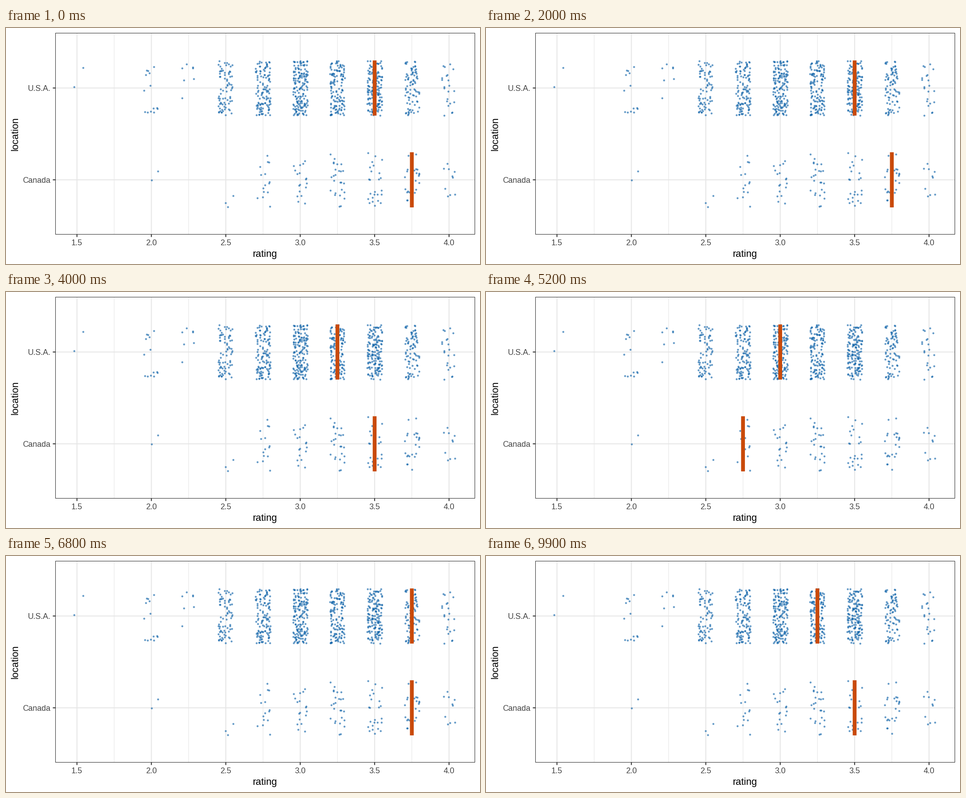
Animation of 1058x529 px, one loop 10000 ms. Source, as a matplotlib script:

```python
import numpy as np
import matplotlib.pyplot as plt
from matplotlib.animation import FuncAnimation
from matplotlib.patches import Rectangle

W, H, DPI = 1058, 529, 100
PX = 72 / DPI                      # points per pixel
LEFT, TOP, RIGHT, BOTTOM = 110.5, 11.5, 1046.5, 462.5
ROW = {"U.S.A.": 134.5, "Canada": 340.3}
BAR_W, BAR_H = 8.5, 123.6
JITTER = np.array([16.4, 61.5])
BLUE, ORANGE = "#0f63a9", "#c94a0a"
GRID, DARK, GREY = "#e6e6e6", "#333333", "#444444"

# rating drawn for each location, one per state
STEP = 4                           # three frames of rest, one in between
DRAWS = {
    "U.S.A.": [3.5, 3.0, 3.25, 3.75, 3.0, 3.5, 2.75, 3.25, 3.25, 3.5, 3.25, 3.0,
               3.5, 3.0, 2.5, 3.0, 3.25, 3.75] + [3.0] * 7,
    "Canada": [3.75, 3.5, 3.25, 3.5, 4.0, 3.75, 3.0, 3.0, 3.75, 3.5, 3.5, 3.75,
               3.25, 2.75, 3.25, 3.0, 3.5, 3.75, 2.75, 3.0, 2.0, 3.5, 4.0, 3.0, 3.25],
}

# points per rating column
COUNTS = {
    "U.S.A.": {2.0: 14, 2.5: 75, 2.75: 117, 3.0: 160, 3.25: 131, 3.5: 155,
               3.75: 82, 4.0: 22},
    "Canada": {2.75: 15, 3.0: 18, 3.25: 26, 3.5: 25, 3.75: 24, 4.0: 10},
}
LONE = [(172, 89), (152, 132), (403, 81), (393, 90), (417, 88), (417, 90), (397, 117),
        (419, 114), (393, 157), (339, 321), (325, 341), (507, 376), (490, 392), (495, 401)]


def x_of(rating):
    return 656.7 + 332.2 * (rating - 3)


def column(rng, rating, y, n):
    return [x_of(rating), y] + JITTER * rng.uniform(-1, 1, (n, 2))


plt.rcParams["font.family"] = "Liberation Sans"
fig = plt.figure(figsize=(W / DPI, H / DPI), dpi=DPI, facecolor="white")
ax = fig.add_axes([0, 0, 1, 1])
ax.set(xlim=(0, W), ylim=(H, 0))
ax.axis("off")


def line(xs, ys, color, width, z):
    ax.plot(xs, ys, color=color, lw=width * PX, zorder=z,
            solid_capstyle="butt", snap=False)


def label(x, y, text, size, color, ha="center", **kw):
    ax.text(x, y, text, fontsize=size * PX, color=color, ha=ha, va="baseline", **kw)


# grid, ticks and labels
for rating in np.arange(1.75, 4, 0.5):
    line([x_of(rating)] * 2, [TOP, BOTTOM], GRID, 1.1, 1)
for rating in np.arange(1.5, 4.1, 0.5):
    x = x_of(rating)
    line([x, x], [TOP, BOTTOM], GRID, 2.1, 1)
    line([x, x], [BOTTOM, BOTTOM + 6], DARK, 2.1, 5)
    label(x, 487, f"{rating:.1f}", 17.6, GREY)
for name, y in ROW.items():
    line([LEFT, RIGHT], [y, y], GRID, 2.1, 1)
    line([LEFT - 6, LEFT], [y, y], DARK, 2.1, 5)
    label(99.5, y + 6.5, name, 17.6, GREY, ha="right")
label(578.2, 513.5, "rating", 22, "black")
label(27, 237, "location", 22, "black", rotation=90, rotation_mode="anchor")
ax.add_patch(Rectangle((LEFT, TOP), RIGHT - LEFT, BOTTOM - TOP, fill=False,
                       ec=DARK, lw=1.1 * PX, zorder=6, snap=False))

# ratings
rng = np.random.default_rng(12)
points = np.vstack([np.array(LONE) + 0.4] + [
    column(rng, rating, ROW[name], n)
    for name, counts in COUNTS.items() for rating, n in counts.items()])
ax.scatter(*points.T, s=(4.3 * PX) ** 2, color=BLUE, alpha=0.66, lw=0, zorder=3)

# sampled outcomes
bars = {name: ax.add_patch(Rectangle((0, y - BAR_H / 2), BAR_W, BAR_H, color=ORANGE,
                                     lw=0, zorder=4, snap=False))
        for name, y in ROW.items()}


def update(frame):
    state, phase = divmod(frame, STEP)
    mix = 0.5 if phase == STEP - 1 else 0
    for name, bar in bars.items():
        path = DRAWS[name]
        start, end = path[state], path[(state + 1) % len(path)]
        bar.set_x(x_of(start + mix * (end - start)) - BAR_W / 2)
    return list(bars.values())


anim = FuncAnimation(fig, update, frames=STEP * len(DRAWS["Canada"]), interval=100,
                     repeat=True, repeat_delay=0, blit=False)
plt.show()
```
